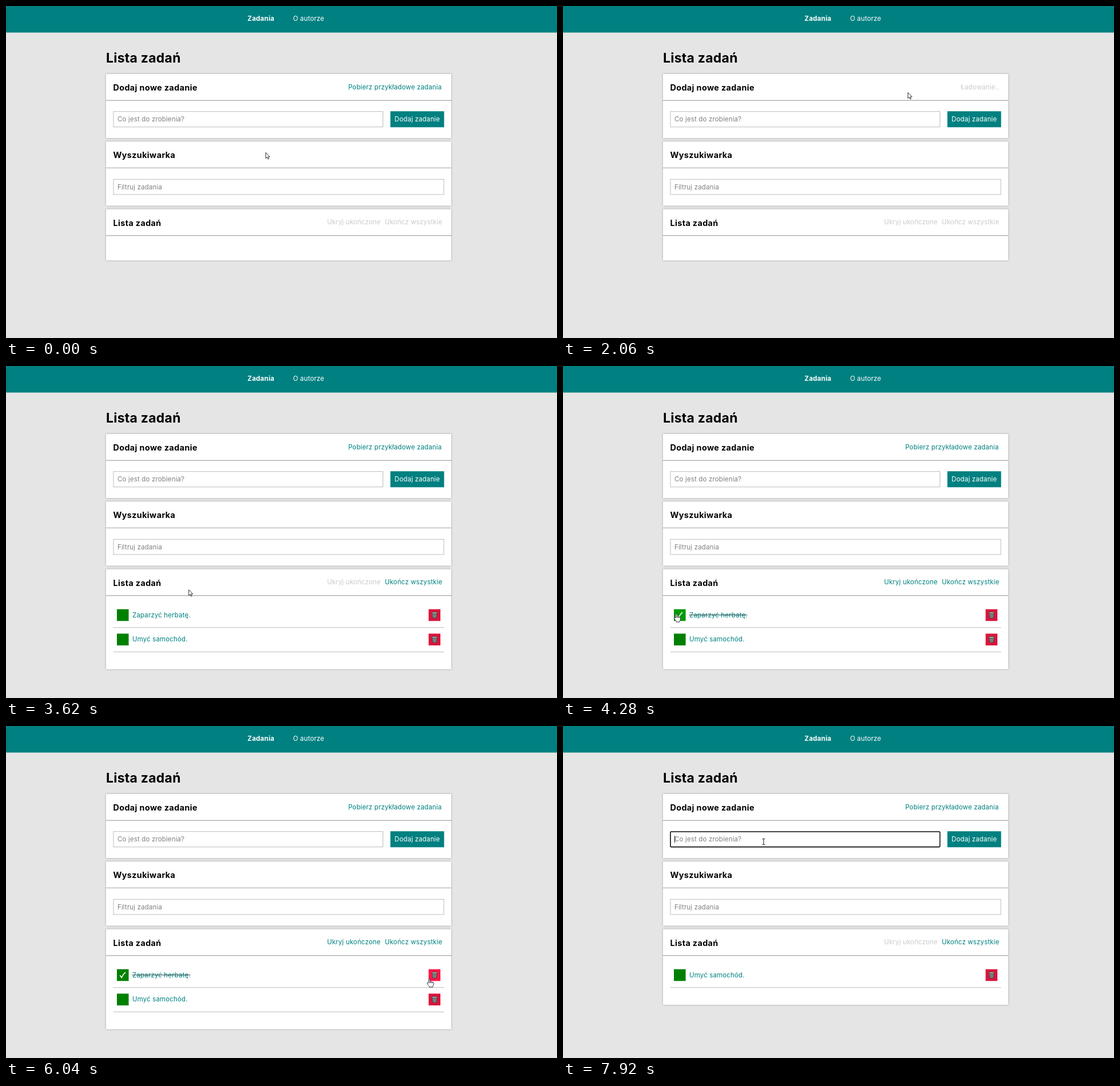
Write an HTML page that moves like this. It is 964 px wide and 581 px high and loops after 8000 ms.

```html
<!DOCTYPE html>
<html lang="pl">
<head>
<meta charset="utf-8">
<title>Lista zadań</title>
<style>
  html, body { margin: 0; width: 100%; height: 100%; overflow: hidden; background: #e5e5e5; }
  svg { display: block; width: 100%; height: 100%; }
  text { font: 11.5px Inter, "Open Sans", sans-serif; letter-spacing: .15px; white-space: pre; }
  .nav { fill: #fff; }
  .bold { font-weight: 700; letter-spacing: .02em; }
  .h1 { font-size: 23px; font-weight: 700; letter-spacing: .01em; }
  .h2 { font-size: 14.4px; font-weight: 700; letter-spacing: .025em; }
  .hint { fill: #808080; }
  .mid { text-anchor: middle; }
  .card { fill: #fff; filter: drop-shadow(0 0 1.5px #999); }
  .field { fill: #fff; stroke: #bcbcbc; }
</style>
</head>
<body>
<svg id="stage" viewBox="0 0 964 581"></svg>
<script>
const LOOP = 8000;
const CLICK = { load: 1940, done: 4280, remove: 6410, focus: 7850 };
const LOADED = 2460;
const ROW = 42.75;
const TEAL = '#008080', LIGHT_TEAL = '#00a0a0', OFF = '#cacaca';

const stage = document.getElementById('stage');

function add(tag, attrs, parent = stage, content) {
  const el = document.createElementNS('http://www.w3.org/2000/svg', tag);
  for (const k in attrs) el.setAttribute(k, attrs[k]);
  if (content) el.textContent = content;
  parent.append(el);
  return el;
}
const rect = (x, y, width, height, attrs, parent) =>
  add('rect', { x, y, width, height, ...attrs }, parent);
const text = (x, y, str, cls = '', parent) => add('text', { x, y, class: cls }, parent, str);
const line = (x1, x2, y, stroke, width, parent) =>
  add('path', { d: `M${x1} ${y}H${x2}`, stroke, 'stroke-width': width }, parent);
const show = (el, on) => el.setAttribute('visibility', on ? 'visible' : 'hidden');
const fill = (el, color) => el.setAttribute('fill', color);

function card(y, height, title) {
  const box = rect(175, y, 604, height, { class: 'card' });
  line(175, 779, y + 46.2, '#b4b4b4', 1.4);
  text(187.5, y + 29.2, title, 'h2');
  return box;
}

function bin(x, y, parent) {
  const g = add('g', { transform: `translate(${x} ${y})`, stroke: '#3c3c3c', 'stroke-width': .9 }, parent);
  add('path', { d: 'M-4.4-3L-3.3 5Q0 6.6 3.3 5L4.4-3Z', fill: '#858585' }, g);
  add('path', { d: 'M-1.5-1L-1.2 5M1.5-1L1.2 5', stroke: '#666', 'stroke-width': .8 }, g);
  add('ellipse', { cx: 0, cy: -3.7, rx: 5.2, ry: 1.7, fill: '#a9a9a9' }, g);
}

function task(label) {
  const g = add('g', {});
  const box = rect(194, 425.6, 20.6, 20.6, {}, g);
  const name = text(221, 439.5, label, '', g);
  const trash = rect(739.4, 425.6, 20.6, 20.6, {}, g);
  bin(749.8, 435.8, g);
  line(187.5, 766.5, 457.6, '#c8c8c8', 1.1, g);
  return { g, box, name, trash };
}

// Page
rect(0, 0, 964, 581, { fill: '#e5e5e5' });
rect(0, 0, 964, 46.5, { fill: TEAL });
text(446, 26, 'Zadania', 'nav bold mid');
text(529.5, 26, 'O autorze', 'nav mid');
text(175, 99, 'Lista zadań', 'h1');

card(119, 112, 'Dodaj nowe zadanie');
const fetchLink = text(680.5, 145.5, 'Pobierz przykładowe zadania', 'mid');
const loadingNote = text(729.5, 145.5, 'Ładowanie..', 'mid');
fill(loadingNote, OFF);
rect(188, 184.7, 471.5, 27, { class: 'field' });
const focusRing = rect(188, 185, 471.5, 26.6, { rx: 1.5, fill: '#fff', stroke: '#101010', 'stroke-width': 1.6 });
text(195, 202.2, 'Co jest do zrobienia?', 'hint');
const caret = rect(195, 192, .9, 12.5, { fill: '#000' });
rect(672.5, 184.2, 94, 28, { fill: TEAL });
text(719.5, 202.2, 'Dodaj zadanie', 'nav mid');

card(237.2, 112.2, 'Wyszukiwarka');
rect(188, 303.3, 578, 26.6, { class: 'field' });
text(195, 320.5, 'Filtruj zadania', 'hint');

const listCard = card(355.6, 89.6, 'Lista zadań');
const hideLink = text(608.5, 382.2, 'Ukryj ukończone', 'mid');
const allLink = text(713, 382.2, 'Ukończ wszystkie', 'mid');

const tea = task('Zaparzyć herbatę.');
const car = task('Umyć samochód.');
const strike = line(220.5, 322.5, 435.8, '#1c4444', 1, tea.g);
const underline = line(221, 322, 445.4, LIGHT_TEAL, .9, tea.g);
const tick = add('path', {
  d: 'M199.6 436.8L202.4 440.3Q204.5 435 208.6 431.4', fill: 'none',
  stroke: '#fff', 'stroke-width': 1.6, 'stroke-linecap': 'round'
}, tea.g);

const status = add('g', {});
rect(-2, 578.6, 215, 6, { fill: '#fff', stroke: '#b8b8b8', 'stroke-width': .9, rx: 1 }, status);

// Pointers, hotspot at 0,0
const outline = { fill: '#fff', stroke: '#1a1a2a', 'stroke-width': .9, 'stroke-linejoin': 'round' };
const pointers = {
  arrow: add('path', { d: 'M.5.5V10.6L2.8 8.5 4.4 12 6 11.3 4.5 7.9H7.6Z', ...outline }),
  hand: add('path', {
    d: 'M-1.2 8V1.4Q-1.1.4-.1.4T1 1.4V5.2Q2.6 4.4 3.2 5.7 4.9 5 5.4 6.3 7.4 5.8 7.5 7.6' +
       'V10.5Q7.3 12.5 6 13.5V15H.3V13.7Q-1.4 12.3-2.4 10.2L-3.7 8.3Q-3.8 6.8-2.4 7Z' +
       'M1 5.4V8M3.2 5.9V8M5.4 6.5V8.2', ...outline
  }),
  beam: add('path', {
    d: 'M-2.3-5H-.7L0-4.5.7-5H2.3M0-4.5V4.5M-2.3 5H-.7L0 4.5.7 5H2.3',
    fill: 'none', stroke: '#111', 'stroke-width': 1
  })
};

// Pointer track: time, x, y
const track = [
  [0, 454, 256], [350, 454, 256], [1130, 590, 156], [1160, 590, 156],
  [1610, 604, 149], [1940, 604, 149], [2060, 603, 151], [2730, 560, 189],
  [3550, 346, 381], [3620, 319.5, 391], [4240, 198, 433], [4580, 198, 433],
  [5080, 300.5, 432], [5370, 537, 434], [6040, 740.5, 442], [6210, 740.5, 442],
  [6240, 742, 442], [6810, 742, 442], [7020, 638.5, 398], [7610, 357, 217],
  [7840, 351, 202.5], [LOOP, 351, 202.5]
];

const slope = (i, k) => track[i] && track[i + 1]
  ? (track[i + 1][k] - track[i][k]) / (track[i + 1][0] - track[i][0]) : 0;

// Monotone tangent: harmonic mean of the neighbouring slopes
function tangent(i, k) {
  const a = slope(i - 1, k), b = slope(i, k);
  return a * b > 0 ? 2 * a * b / (a + b) : 0;
}

function pointerAt(t) {
  let i = 0;
  while (i < track.length - 2 && track[i + 1][0] <= t) i++;
  const p = track[i], q = track[i + 1];
  const h = q[0] - p[0], u = (t - p[0]) / h, v = 1 - u;
  return [1, 2].map(k =>
    v * v * (1 + 2 * u) * p[k] + u * u * (3 - 2 * u) * q[k] +
    h * u * v * (v * tangent(i, k) - u * tangent(i + 1, k)));
}

const ramp = (t, start, length) => Math.min(1, Math.max(0, (t - start) / length));

function render(t) {
  const [x, y] = pointerAt(t);
  const over = (l, top, r, bottom) => x >= l && x <= r && y >= top && y <= bottom;

  const loading = t >= CLICK.load && t < LOADED;
  const removed = t >= CLICK.remove;
  const count = t < LOADED ? 0 : removed ? 1 : 2;
  const done = t >= CLICK.done && !removed;
  const focused = t >= CLICK.focus;

  const overFetch = !loading && over(591, 131, 770, 151);
  const overBox = count > 0 && over(194, 425, 214.6, 446.2);
  const overName = count === 2 && over(221, 427, 322, 446.2);
  const overTrash = count > 0 && over(739.4, 425, 760, 446.2);
  const overField = over(188, 184.5, 659.5, 212) || over(188, 303, 766, 330);

  show(fetchLink, !loading);
  show(loadingNote, loading);
  fill(fetchLink, overFetch ? LIGHT_TEAL : TEAL);
  show(focusRing, focused);
  show(caret, focused);

  listCard.setAttribute('height', 89.6 + count * ROW);
  fill(hideLink, done ? TEAL : OFF);
  fill(allLink, count ? TEAL : OFF);

  show(tea.g, count === 2);
  show(car.g, count > 0);
  car.g.setAttribute('transform', `translate(0 ${removed ? 0 : ROW})`);
  [tea, car].forEach(row => {
    const first = row === (removed ? car : tea);
    fill(row.box, first && overBox ? '#009a00' : '#008000');
    fill(row.trash, first && overTrash ? '#ff1746' : '#dc143c');
    fill(row.name, row === tea && overName ? LIGHT_TEAL : TEAL);
  });
  show(strike, done);
  show(tick, done);
  show(underline, overName);
  status.setAttribute('opacity', ramp(t, 4840, 120) * (1 - ramp(t, 5200, 150)));

  const kind = overField ? 'beam'
    : overFetch || overBox || overName || overTrash ? 'hand' : 'arrow';
  for (const k in pointers) show(pointers[k], k === kind);
  pointers[kind].setAttribute('transform', `translate(${x.toFixed(2)} ${y.toFixed(2)})`);
}

const start = performance.now();
function tick60() {
  render((performance.now() - start) % LOOP);
  requestAnimationFrame(tick60);
}
tick60();
</script>
</body>
</html>
```
